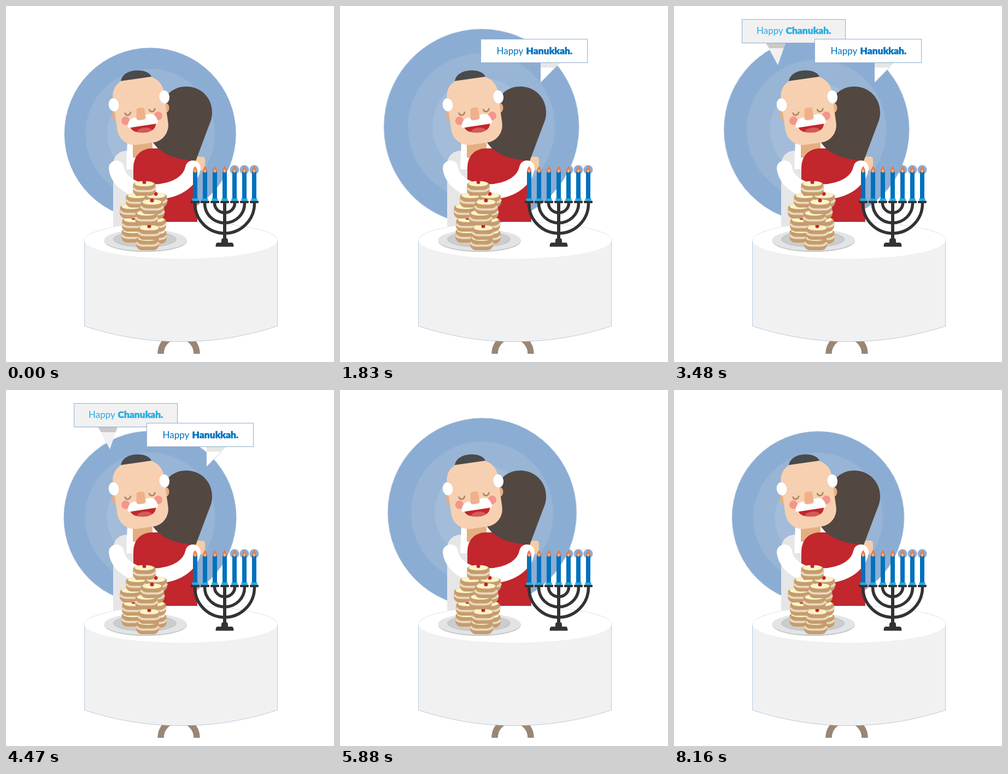
Animation of 600x650 px, one loop 8.19 s. Source, as an HTML page:

```html
<!DOCTYPE html>
<html lang="en">
<head>
<meta charset="utf-8">
<title>Happy Hanukkah</title>
<style>
  html, body { margin: 0; width: 100%; height: 100%; overflow: hidden; background: #fff; }
  svg { display: block; width: 600px; height: 650px; }
  text { font: 400 17px Lato, "Open Sans", sans-serif; }
  .bold { font-weight: 900; font-size: 17.4px; stroke: currentColor; stroke-width: .5px; }
  .glow { transform-origin: 263.7px 233.3px; animation: pulse 8190ms linear infinite; }
  .bubble { stroke: #8cadd3; stroke-width: 1; }
  .first { color: #0071bc; animation: first 8190ms step-end infinite; }
  .second { color: #29abe2; animation: second 8190ms step-end infinite; }
  @keyframes pulse {
    0%, 55.556%, 100% { transform: none; }
    27.778%, 83.2% { transform: translate(-6.2px, -15.8px) scale(1.1706); }
  }
  @keyframes first {
    0%, 66.667%, 100% { visibility: hidden; }
    5.556% { visibility: visible; }
  }
  @keyframes second {
    0%, 66.667%, 100% { visibility: hidden; }
    27.778% { visibility: visible; }
  }
</style>
</head>
<body>
<svg viewBox="0 0 600 650">
  <defs>
    <g id="donut">
      <rect x="-21" y="2" width="42" height="25" rx="11" fill="#c69c6d"/>
      <path d="M-20.5 12.500Q-17 18.500 -8 18.500H8Q17 18.500 20.5 12.500" fill="none" stroke="#ead8c0" stroke-width="4"/>
      <ellipse cy="7" rx="20.500" ry="7" fill="#c69c6d"/>
      <ellipse cy="5" rx="17.500" ry="4.800" fill="#fcf3c8"/>
    </g>
    <g id="candle">
      <rect x="-4" y="302" width="8" height="52" fill="#0071bc"/>
      <path d="M0 292C2 296 4 298 4 301Q4 304 0 304Q-4 304 -4 301C-4 298 -2 296 0 292Z" fill="#e9734b"/>
      <path d="M0 297Q2 300 2 302Q2 304 0 304Q-2 304 -2 302Q-2 300 0 297Z" fill="#fbb676"/>
      <rect x="-8" y="355.500" width="16" height="4.500" rx="1.500" fill="#333"/>
      <path d="M-6 351.500H6L5 356H-5Z" fill="#29abe2"/>
    </g>
  </defs>

  <g class="glow">
    <circle cx="263.700" cy="233.300" r="157" fill="#8cadd3"/>
    <circle cx="263.700" cy="233.300" r="118.300" fill="#98b5d6"/>
    <circle cx="263.700" cy="233.300" r="79" fill="#a2bcda"/>
  </g>

  <g class="second">
    <path d="M168 67.500H204L190 108Z" fill="#f1f1f1"/>
    <path d="M168 67.500H204L200.700 77H174Z" fill="#c9c9c9"/>
    <rect class="bubble" x="124.500" y="24.500" width="189" height="43" fill="#f1f1f1"/>
    <g fill="currentColor"><text x="151" y="51">Happy</text><text class="bold" x="204.500" y="51">Chanukah.</text></g>
  </g>
  <g class="first">
    <path d="M367 103H403L367 140Z" fill="#fff"/>
    <path d="M367 103H403L394 112.500H367Z" fill="#e6e6e6"/>
    <path d="M394 112.500L367 140" stroke="#8cadd3" stroke-width=".7"/>
    <rect class="bubble" x="257.500" y="60.500" width="195" height="43" fill="#fff"/>
    <g fill="currentColor"><text x="286.500" y="87.500">Happy</text><text class="bold" x="340.500" y="87.500">Hanukkah.</text></g>
  </g>

  <!-- far edge of the table -->
  <path d="M143.500 428A176.500 33.500 0 0 1 496.500 428" fill="none" stroke="#8cadd3"/>

  <!-- couple -->
  <path d="M196 408V290C196 273 208 264 222 264H240V408Z" fill="#e6e6e6"/>
  <path d="M222 246L220 298H234L268 262H279L266 244Z" fill="#fff"/>
  <path d="M232 248H268V268L250 277H232Z" fill="#e5ae80"/>
  <rect x="345" y="275" width="19" height="25" rx="5" fill="#f4cca8"/>
  <path d="M233 394V296C233 273 247 260 268 260H300L346 281L350 394Z" fill="#c1272d"/>
  <path d="M377 193C377.500 204 374 212 371 219L347 283C312 280 284 272 268 248L288 180C291 160 308 147 330 147C356 147 376.500 167 377 193Z" fill="#534741"/>
  <path d="M202 296C206 324 240 341 272 339.500C311 338 337 321 342 296" fill="none" stroke="#fff" stroke-width="28" stroke-linecap="round"/>

  <!-- face -->
  <g fill="#e5ae80">
    <ellipse cx="199" cy="200" rx="5" ry="8.500"/>
    <ellipse cx="293" cy="186" rx="5.500" ry="8.500"/>
  </g>
  <rect x="199" y="130" width="94" height="122" rx="32" fill="#f7d0b1" transform="rotate(-8 246 191)"/>
  <path d="M210 137C212 125 224 118 240 117.500C254 117.500 263 122 266 129Z" fill="#4a4a4a"/>
  <g fill="#fff">
    <ellipse cx="197" cy="180.500" rx="9.300" ry="12" transform="rotate(-8 197 180.500)"/>
    <ellipse cx="289.800" cy="166" rx="9.300" ry="12" transform="rotate(-8 289.800 166)"/>
  </g>
  <g fill="#f3938a" opacity=".95">
    <circle cx="218.500" cy="209.500" r="7.700"/>
    <circle cx="278.500" cy="200.500" r="7.700"/>
  </g>
  <g fill="none" stroke="#b08b66" stroke-width="3">
    <path d="M217.500 194.500C218 201.500 228 200.500 228 193"/>
    <path d="M262 188C262.500 195 272.500 194 272.500 186.500"/>
  </g>
  <path d="M228 222L274 215C274 224 266 230 254 231C241 232 230 229 228 222Z" fill="#c1272d"/>
  <path d="M239 229.500C242 224 249 222 256 222Q264 222 267 226.500Q261 230.500 254 231Q245 231.500 239 229.500Z" fill="#d65a58"/>
  <path d="M223 222.500C222 210 228 203.500 238 204L258 198C270 195 277 201 278 214Z" fill="#fff"/>
  <path d="M238.500 190Q239 186.500 243 186L249 185.300Q252.500 185 253.200 188.500L255.500 203Q255.500 207 250 207.800L244 208.500Q239 208.500 238.500 205Z" fill="#f0b08a"/>

  <!-- table -->
  <path d="M283 635A33 33 0 0 1 349 635" fill="none" stroke="#998675" stroke-width="11.500"/>
  <path d="M143.500 428V584.500A564 564 0 0 0 496.500 584.500V428Z" fill="#f1f1f1" stroke="#8cadd3" stroke-width=".6"/>
  <ellipse cx="320" cy="427.800" rx="176.700" ry="33.500" fill="#fff"/>

  <!-- plate -->
  <ellipse cx="255.300" cy="429" rx="75.500" ry="20" fill="#c6c7c9"/>
  <ellipse cx="255" cy="427.500" rx="75.500" ry="19.500" fill="#e3e4e5"/>
  <ellipse cx="254" cy="426" rx="57.500" ry="14" fill="#cbcccd" stroke="#bdbebf"/>
  <g id="donuts"></g>

  <!-- menorah -->
  <g id="halos" fill="#8cadd3"></g>
  <g fill="none" stroke="#333" stroke-width="5.500">
    <path d="M345.500 358V360.500A54.500 54.500 0 0 0 454.500 360.500V358"/>
    <path d="M363.500 358V360.500A36.500 35.500 0 0 0 436.500 360.500V358"/>
    <path d="M381.500 358V360A18.500 17.500 0 0 0 418.500 360V358"/>
    <path d="M400 356V430" stroke-width="6"/>
  </g>
  <path d="M394 434V428Q394 424 398 424H402Q406 424 406 428V432H413Q416.500 432 416.500 439.500H383.500Q383.500 432 387 432H394Z" fill="#333"/>
  <g id="candles"></g>
</svg>
<script>
  const make = (parent, tag, attrs) => {
    const node = document.createElementNS("http://www.w3.org/2000/svg", tag);
    for (const key in attrs) node.setAttribute(key, attrs[key]);
    document.getElementById(parent).append(node);
  };

  // x, top, has a berry; from the plate upwards
  const stack = [
    [232, 405], [273, 407], [259, 419],
    [233, 385, 1], [272, 385], [262, 400, 1],
    [229, 361], [269, 362], [257, 373],
    [240, 341, 1], [274, 341, 1], [267, 353, 1],
    [253, 319.5, 1]
  ];
  for (const [x, y, berry] of stack) {
    make("donuts", "use", { href: "#donut", x, y });
    if (berry) make("donuts", "circle", { cx: x, cy: y + 2, r: 3.5, fill: "#c1272d" });
  }

  for (let i = 0; i < 7; i++) {
    const x = 346 + 18 * i;
    if (i > 3) make("halos", "circle", { cx: x, cy: 299, r: 8.5 });
    make("candles", "use", { href: "#candle", x });
  }
</script>
</body>
</html>
```
